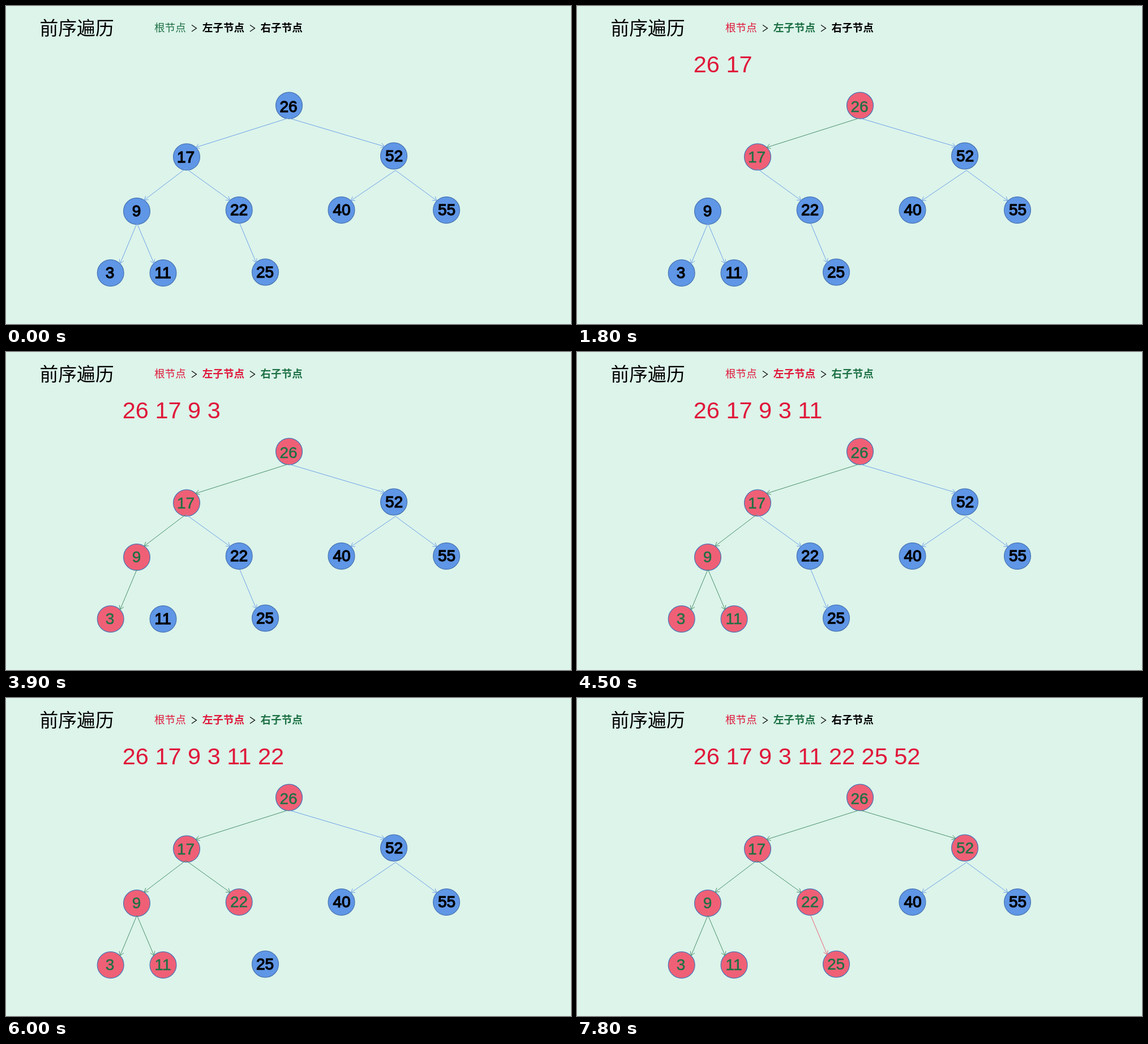
An HTML page for the animation above (8000 ms loop, 998 by 561 pixels).

```html
<!DOCTYPE html>
<html lang="zh-CN">
<head>
<meta charset="utf-8">
<style>
html, body { margin: 0; width: 100%; height: 100%; overflow: hidden; background: #dcf4ea; }
svg { display: block; width: 100vw; height: 100vh; }
text { font-family: "Noto Sans CJK SC", "Noto Sans CJK", sans-serif; }
.num { font: 28px "Liberation Sans", Arial, sans-serif; text-anchor: middle; }
.list { font: 41.5px "Liberation Sans", Arial, sans-serif; }
.head { font-size: 18.6px; }
</style>
</head>
<body>
<svg id="stage" viewBox="0 0 998 561"></svg>
<script>
const LOOP = 8000, STEP = 300;
const BLUE = '#5f96e6', PINK = '#ef6076', RED = '#e0183a', GREEN = '#1e7145', BLACK = '#000';
const LINK_BLUE = '#70a2e9', LINK_GREEN = '#4a8f6c';
const stage = document.getElementById('stage');

function add(tag, attrs, content = '') {
  const el = document.createElementNS('http://www.w3.org/2000/svg', tag);
  for (const k in attrs) el.setAttribute(k, attrs[k]);
  el.textContent = content;
  stage.append(el);
  return el;
}

// value, centre x, centre y, label x, visit step
const nodes = [
  [26, 500, 175.5, 499, 1], [17, 319, 266.3, 317.5, 5], [52, 685, 264.5, 685.5, 25],
  [9, 231, 362, 230.5, 8], [22, 411.7, 360, 411.5, 19], [40, 592.5, 360, 593, 99],
  [55, 778, 360, 778.5, 99], [3, 184.7, 471, 183.5, 11], [11, 277.5, 471, 277, 15],
  [25, 458, 469.5, 457.5, 22]
].map(([value, x, y, tx, at]) => ({
  value, at,
  disc: add('circle', { cx: x, cy: y, r: 23.4, stroke: '#4a77b6', 'stroke-width': 1.3 }),
  label: add('text', { class: 'num', x: tx, y: y + (value === 26 ? 11 : 9.3) }, value)
}));

// start, tip, step at which the link vanishes, colour it returns with one step later
const links = [
  [498, 198, 335, 249.5, 3, LINK_GREEN], [502, 198.5, 669, 248, 23, LINK_GREEN],
  [317, 287, 244, 342.5, 6, LINK_GREEN], [317.5, 286.5, 396, 343, 17, LINK_GREEN],
  [231, 384, 201.5, 454.5, 9, LINK_GREEN], [231.3, 383.5, 261.5, 454.5, 13, LINK_GREEN],
  [413, 384, 442, 453, 20, PINK], [688, 290, 609, 343.5, 99, LINK_GREEN],
  [688, 290, 761, 343.5, 99, LINK_GREEN]
].map(([x1, y1, x2, y2, at, color]) => {
  const a = Math.atan2(y2 - y1, x2 - x1);
  const wing = s => `${x2 - 8 * Math.cos(a + s)} ${y2 - 8 * Math.sin(a + s)}`;
  const d = `M${x1} ${y1}L${x2} ${y2}M${wing(.55)}L${x2} ${y2}L${wing(-.55)}`;
  return { at, color, path: add('path', { d, fill: 'none', 'stroke-width': 1 }) };
});

add('text', { x: 59.5, y: 50.9, 'font-size': 32.8 }, '前序遍历');
const head = (x, s, weight) => add('text', { class: 'head', x, y: 45.3, 'font-weight': weight }, s);
const rootHead = head(262, '根节点', 400);
const leftHead = head(346.7, '左子节点', 700);
const rightHead = head(449.5, '右子节点', 700);
for (const x of [328, 431])
  add('path', { d: `M${x} 33.5l8.5 5.7l-8.5 5.7`, fill: 'none', stroke: BLACK, 'stroke-width': 1.2 });
const list = add('text', { class: 'list', x: 205.7, y: 117, fill: RED });

const paint = (el, color) => el.setAttribute('fill', color);

function draw(now) {
  const step = Math.floor(now % LOOP / STEP);
  for (const n of nodes) {
    const seen = step >= n.at, ink = seen ? GREEN : BLACK;
    paint(n.disc, seen ? PINK : BLUE);
    paint(n.label, ink);
    n.label.setAttribute('stroke', ink);
    n.label.setAttribute('stroke-width', seen ? .5 : 1.3);
  }
  for (const l of links)
    l.path.setAttribute('stroke', step < l.at ? LINK_BLUE : step === l.at ? 'none' : l.color);

  const toRight = step >= 12 && step < 26;
  paint(rootHead, step < 1 ? GREEN : RED);
  paint(leftHead, step < 2 ? BLACK : toRight ? RED : GREEN);
  paint(rightHead, toRight ? GREEN : BLACK);

  list.textContent = nodes.filter(n => step >= n.at)
    .sort((a, b) => a.at - b.at).map(n => n.value).join(' ');
}

const start = performance.now();
function tick() {
  draw(performance.now() - start);
  requestAnimationFrame(tick);
}
tick();
</script>
</body>
</html>
```
